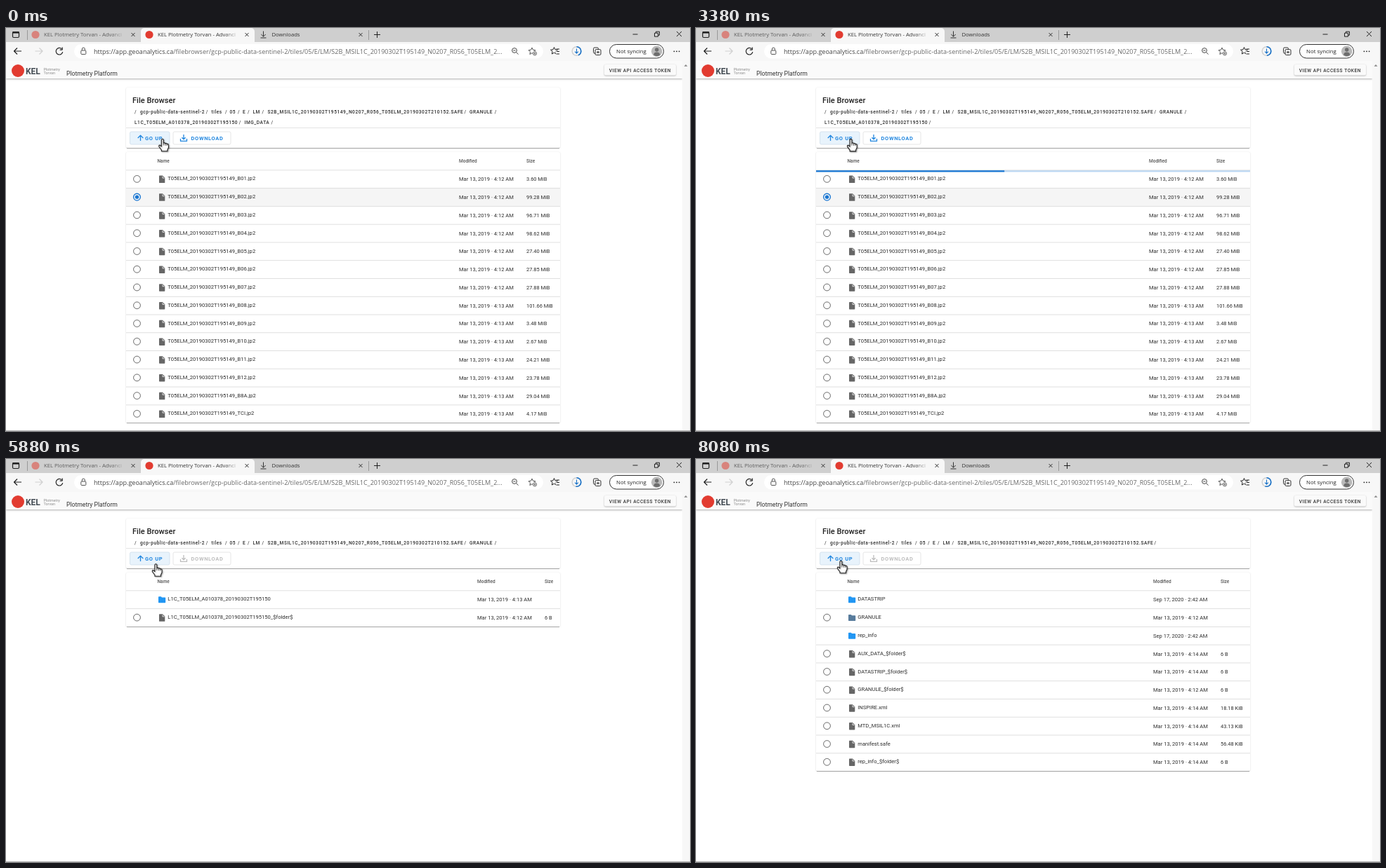
Animation, 974 px wide and 575 px high, one loop 8.18 s. Source, as an HTML page with a canvas:

```html
<!DOCTYPE html>
<html lang="en">
<head>
<meta charset="utf-8">
<title>File Browser</title>
<style>
html, body { margin: 0; width: 100%; height: 100%; overflow: hidden; background: #fff; }
canvas { display: block; width: 974px; height: 575px; }
</style>
</head>
<body>
<canvas id="stage"></canvas>
<script>
const W = 974, H = 575, LOOP = 8180;
const canvas = document.getElementById('stage');
const c = canvas.getContext('2d');
const dpr = window.devicePixelRatio || 1;
canvas.width = W * dpr;
canvas.height = H * dpr;

const UI = '"Open Sans", "Noto Sans", sans-serif';
const APP = 'Roboto, Arial, sans-serif';
const BLUE = '#1976d2', ACTION = '#2387df', RED = '#e23b30';
const SITE = 'KEL Plotmetry Torvan';
const LEFT = 171, WIDE = 618, ROW = 25.77;

// ---------- drawing helpers ----------
function text(s, x, y, size, color, { font = APP, weight = 400, ls = 0 } = {}) {
  c.font = `${weight} ${size}px ${font}`;
  c.letterSpacing = ls + 'px';
  c.fillStyle = color;
  c.fillText(s, x, y);
}
function rect(x, y, w, h, color) {
  c.fillStyle = color;
  c.fillRect(x, y, w, h);
}
function box(x, y, w, h, r, fill, stroke, lw = 1) {
  c.beginPath();
  c.roundRect(x, y, w, h, r);
  if (fill) { c.fillStyle = fill; c.fill(); }
  if (stroke) { c.strokeStyle = stroke; c.lineWidth = lw; c.stroke(); }
}
function disc(x, y, r, fill) {
  c.beginPath();
  c.arc(x, y, r, 0, 7);
  c.fillStyle = fill;
  c.fill();
}
function ring(x, y, r, color, lw, a = 0, b = Math.PI * 2) {
  c.beginPath();
  c.arc(x, y, r, a, b);
  c.strokeStyle = color;
  c.lineWidth = lw;
  c.stroke();
}
// SVG path placed at x, y
function path(d, x, y, stroke, lw = 1, fill) {
  c.save();
  c.translate(x, y);
  const p = new Path2D(d);
  if (fill) { c.fillStyle = fill; c.fill(p); }
  if (stroke) {
    c.strokeStyle = stroke;
    c.lineWidth = lw;
    c.lineJoin = 'round';
    c.stroke(p);
  }
  c.restore();
}
function shadow(alpha, blur, dy) {
  c.shadowColor = `rgba(0,0,0,${alpha})`;
  c.shadowBlur = blur * dpr;
  c.shadowOffsetY = dy * dpr;
}
function card(x, y, w, h) {
  c.save();
  shadow(.22, 1.6, .4);
  box(x, y, w, h, 2, '#fff');
  c.restore();
  rect(x + 1, Math.round(y + h), w - 2, 1, 'rgba(0,0,0,.28)');
}

// ---------- timing ----------
const clamp = v => Math.max(0, Math.min(1, v));
const mix = (a, b, k) => a + (b - a) * k;
function ease(x) {
  let lo = 0, hi = 1, u = .5;
  for (let i = 0; i < 20; i++) {
    u = (lo + hi) / 2;
    const px = .75 * (1 - u) * u + u * u * u;
    if (px < x) lo = u; else hi = u;
  }
  return .3 * (1 - u) * (1 - u) * u + 3 * (1 - u) * u * u + u * u * u;
}

// click, start of loading, end of loading, status bubble, ripple
const visits = [
  { click: 730, start: 855, done: 3430, status: [930, 1480], x: 222, y: 158, r: 6 },
  { click: 4480, start: 4474, done: 5680, status: [4480, 5080], x: 215, y: 157, r: 17 },
  { click: 6930, start: 7030, done: 8030, status: [7030, 7580], x: 205, y: 142, r: 14.5 }
];
// time, x, y of the pointer tip
const moves = [
  [0, 222.8, 158], [1580, 222.8, 158], [1980, 220.5, 158.3], [4330, 220.5, 158],
  [4700, 220.5, 157.5], [5150, 213.4, 149.5], [5880, 213.4, 149.5], [6080, 209, 147],
  [6480, 209, 147], [6630, 206.4, 145], [LOOP, 206.4, 145]
];
function pointer(t) {
  let i = 1;
  while (moves[i][0] < t) i++;
  const [t0, x0, y0] = moves[i - 1], [t1, x1, y1] = moves[i];
  const k = (t - t0) / (t1 - t0);
  return [mix(x0, x1, k), mix(y0, y1, k)];
}

// ---------- data ----------
const march = m => `Mar 13, 2019 · 4:${m} AM`;
const sept = 'Sep 17, 2020 · 2:42 AM';
const file = (name, min, size = '6 B') => ({ name, date: march(min), size, radio: true });
const dir = (name, date = sept, color = '#2196f3') => ({ name, date, size: '', color });

const bands = ['B01', 'B02', 'B03', 'B04', 'B05', 'B06', 'B07', 'B08', 'B09', 'B10', 'B11', 'B12', 'B8A', 'TCI'];
const sizes = '3.60 99.28 96.71 98.62 27.40 27.85 27.88 101.66 3.48 2.67 24.21 23.78 29.04 4.17'.split(' ');
const granule = 'L1C_T05ELM_A010378_20190302T195150';

const tables = [
  { col: 645, rows: bands.map((b, i) => file(`T05ELM_20190302T195149_${b}.jp2`, i < 7 ? 12 : 13, sizes[i] + ' MiB')) },
  { col: 647, rows: [
    dir('AUX_DATA'), dir('IMG_DATA', march(13)), dir('QI_DATA'),
    file('AUX_DATA_$folder$', 12), file('IMG_DATA_$folder$', 12),
    file('MTD_TL.xml', 13, '538.29 KiB'), file('QI_DATA_$folder$', 12)
  ] },
  { col: 671, rows: [dir(granule, march(13)), file(granule + '_$folder$', 12)] },
  { col: 651, rows: [
    dir('DATASTRIP'), { ...dir('GRANULE', march(12), '#587c9c'), radio: true }, dir('rep_info'),
    file('AUX_DATA_$folder$', 14), file('DATASTRIP_$folder$', 14), file('GRANULE_$folder$', 12),
    file('INSPIRE.xml', 14, '18.18 KiB'), file('MTD_MSIL1C.xml', 14, '43.13 KiB'),
    file('manifest.safe', 14, '56.48 KiB'), file('rep_info_$folder$', 14)
  ] }
];
tables[0].rows[1].picked = true;

// label, x, x of the slash, y
const crumbs = [
  ['', 0, 183, 122], ['gcp-public-data-sentinel-2', 191, 284.8, 122], ['tiles', 292.5, 312, 122],
  ['05', 318.5, 330, 122], ['E', 337, 344, 122], ['LM', 351.5, 364.5, 122],
  ['S2B_MSIL1C_20190302T195149_N0207_R056_T05ELM_20190302T210152.SAFE', 372.5, 652.5, 122],
  ['GRANULE', 660, 695.7, 122], [granule, 183, 331.7, 136.8], ['IMG_DATA', 339.5, 377.5, 136.8]
];

// ---------- browser window ----------
function fadeRight(x, color) {
  const g = c.createLinearGradient(x, 0, x + 24, 0);
  g.addColorStop(0, color);
  g.addColorStop(1, color + '00');
  return g;
}
function tab(x, label, color, dot) {
  if (dot) {
    disc(x + 12, 9.5, 5.6, dot);
    text(label, x + 24, 12.3, 7.7, fadeRight(x + 118, color), { font: UI });
  }
  path('M-2.5-2.5L2.5 2.5M2.5-2.5L-2.5 2.5', x + 151, 9.5, '#333', 1);
}
function browser(t) {
  rect(0, 0, W, 21, '#cfcfcf');
  rect(0, 20, W, 27, '#f7f7f7');
  box(192, 0, 162, 24, [5, 5, 0, 0], '#f7f7f7');
  const tabTitle = SITE + ' - Advanci';
  tab(30, tabTitle, '#5c5c5c', '#d8837c');
  tab(192, tabTitle, '#333333', RED);
  tab(354, '', '#444444');
  text('Downloads', 378.5, 12.3, 7.7, '#333', { font: UI });
  path('M0-4.5V3M-3.2 0L0 3.2L3.2 0M-4 5H4', 366.5, 9, '#333', 1);
  rect(30, 3, 1, 14, '#999');
  rect(516, 3, 1, 14, '#999');
  path('M-4.5 0H4.5M0-4.5V4.5', 528.5, 9.5, '#222', 1);
  box(9.5, 5.5, 9, 8, 1.5, null, '#222', 1.2);
  rect(9.5, 5, 9, 2.6, '#222');
  path('M-3.5 0H3.5', 896, 9, '#222', 1);
  path('M-3-1H2V4H-3ZM-1-1V-3H4V2H2', 926.5, 8.2, '#222', 1);
  path('M-3.5-3.5L3.5 3.5M3.5-3.5L-3.5 3.5', 958.5, 8.5, '#222', 1);

  path('M5.5 0H-5M-.5-4.5L-5 0L-.5 4.5', 16.5, 33, '#222', 1.2);
  path('M-5.5 0H5M.5-4.5L5 0L.5 4.5', 47, 33, '#d0d0d0', 1.2);
  ring(76, 33.2, 4.8, '#222', 1.2, .2, 5.5);
  path('M0 0V-3.6M0 0H-3.6', 80.2, 31.2, '#222', 1.2);
  box(97, 23, 668, 20.5, 10, '#fff');
  box(106.8, 32, 7, 5.5, 1, null, '#555', 1);
  path('M-2 0V-2Q-2-4 0-4Q2-4 2-2V0', 110.3, 32, '#555', 1);
  const host = 'https://app.geoanalytics.ca';
  text(host, 125, 36.5, 9.05, '#444', { font: UI });
  text('/filebrowser/gcp-public-data-sentinel-2/tiles/05/E/LM/S2B_MSIL1C_20190302T195149_N0207_R056_T05ELM_2...',
    125 + c.measureText(host).width, 36.5, 9.05, '#696969', { font: UI });

  ring(724, 32, 3.4, '#444', 1);
  path('M0 0L3 3M-4.2-2.6H-1', 726.5, 34.6, '#444', 1);
  const star = 'M0-5L1.5-1.7L5-1.3L2.4 1L3.1 4.5L0 2.7L-3.1 4.5L-2.4 1L-5-1.3L-1.5-1.7Z';
  path(star, 749, 33, '#444', .9);
  disc(753, 36.3, 3.2, '#fff');
  ring(753, 36.3, 2.6, '#444', .8);
  path('M-1.4 0H1.4M0-1.4V1.4', 753, 36.3, '#444', .8);
  path(star, 780.5, 32.5, '#222', 1);
  rect(783, 32.5, 6, 6, '#f7f7f7');
  path('M0-3.5H4.5M.5 0H4.5M0 3.5H4.5', 783.5, 33.5, '#222', 1.1);
  ring(812.5, 33, 6.3, '#d2d2d2', 1.6);
  ring(812.5, 33, 6.3, '#1670c8', 1.6, -Math.PI / 2, Math.PI / 2 - .38 + .76 * t / LOOP);
  path('M0-3.4V3M-2.4.7L0 3.2L2.4.7', 812.5, 33, '#1670c8', 1.1);
  box(836.5, 28, 7, 8, 1.5, null, '#333', 1);
  box(839, 30.5, 8, 8, 1.5, '#f7f7f7', '#333', 1);
  path('M-2 0H2M0-2V2', 843, 34.5, '#333', 1);
  box(859.5, 23.5, 77, 19.5, 9.8, '#fff', '#333', 1);
  text('Not syncing', 869, 36, 7.85, '#222', { font: UI });
  disc(926.7, 33.2, 7.8, '#b9b9b9');
  disc(926.7, 31, 2.7, '#6d6d6d');
  path('M-4.5 4Q-4.5 0 0 0Q4.5 0 4.5 4Q0 7-4.5 4Z', 926.7, 34.4, null, 0, '#6d6d6d');
  for (let i = -1; i < 2; i++) disc(955 + i * 3.6, 33.3, .9, '#222');
}

// ---------- page ----------
function appBar() {
  c.save();
  shadow(.32, 2.5, .7);
  rect(0, 47, 963, 25, '#fafafa');
  c.restore();
  rect(0, 46, W, 1, '#e2e2e2');
  disc(17, 61, 9, RED);
  text('KEL', 28, 66, 12, '#474f57', { weight: 700 });
  text('Plotmetry', 53.5, 61, 5.4, '#8b8b8b');
  text('Torvan', 53.5, 66.3, 5.4, '#8b8b8b');
  text('Plotmetry Platform', 86, 68.3, 8.65, '#333');
  c.save();
  shadow(.3, 2, .8);
  box(852, 52, 102, 15.5, 2, '#fafafa');
  c.restore();
  text('VIEW API ACCESS TOKEN', 858.8, 62.5, 6.6, '#333', { weight: 500, ls: .55 });
  rect(963, 47, 11, 528, '#f7f7f7');
  path('M-2.5 1.2L0-1.5L2.5 1.2Z', 968, 53.5, null, 0, '#888');
}

function toolbar(t, y, off) {
  const hover = t < 4530 || t >= 5880;
  c.save();
  box(176.5, y - 9, 56.5, 18, 2, '#fff');
  c.clip();
  if (hover) rect(176, y - 9, 58, 18, 'rgba(33,135,223,.1)');
  for (const v of visits) {
    const age = t - v.click;
    if (age < 0 || age > 600) continue;
    const fade = 1 - clamp((age - 250) / 350);
    if (hover) rect(176, y - 9, 58, 18, `rgba(33,135,223,${.07 * fade})`);
    disc(v.x, y, v.r + 42 * ease(clamp(age / 300)), `rgba(33,135,223,${.3 * fade})`);
  }
  c.restore();
  box(176.5, y - 9, 56.5, 18, 2, null, hover ? '#d3e0ec' : '#e0e0e0', .9);
  path('M0 4V-3.6M-3.8 0L0-3.8L3.8 0', 191.5, y, ACTION, 1.3);
  text('GO UP', 198, y + 2.7, 7.5, ACTION, { weight: 600, ls: .67 });

  box(238, y - 9, 82, 18, 2, null, '#e4e4e4', .9);
  const [r, g, b] = [35, 135, 223].map(v => Math.round(mix(v, 190, off)));
  const color = `rgb(${r},${g},${b})`;
  path('M0-5V1.4M-2.6-.8L0 1.8L2.6-.8M-4.5 1V4.4H4.5V1', 253, y, color, 1.3);
  text('DOWNLOAD', 263.5, y + 2.7, 7.5, color, { weight: 600, ls: .67 });
}

function progress(y, time) {
  const k = (time % 2200) / 2200;
  const h = 2.2;
  rect(LEFT, y, WIDE, h, '#bad6f2');
  let a, b;
  if (k < .6) {
    const e = ease(k / .6);
    a = mix(-2, 1.07, e);
    b = 1.08 * e;
  } else {
    const e = ease((k - .6) / .4);
    a = mix(-.9, 1, e);
    b = 1.35 * e;
  }
  a = clamp(a);
  b = clamp(b);
  rect(LEFT + a * WIDE, y, (b - a) * WIDE, h, BLUE);
}

function drawRow(row, y, col) {
  if (row.picked) rect(LEFT, y - ROW / 2, WIDE, ROW, '#f5f5f5');
  if (row.radio) {
    ring(186.5, y, 4.9, row.picked ? BLUE : '#666', row.picked ? 1.3 : 1);
    if (row.picked) disc(186.5, y, 2.7, BLUE);
  }
  if (row.color) {
    path('M-5-3.6Q-5-4.4-4.2-4.4H-1.2L0-3.2H4.4Q5.2-3.2 5.2-2.4V3.8Q5.2 4.6 4.4 4.6H-4.2Q-5 4.6-5 3.8Z',
      222, y + .2, null, 0, row.color);
  } else {
    path('M-4-4.6Q-4-5.2-3.3-5.2H1L4.3-2V4.6Q4.3 5.3 3.6 5.3H-3.3Q-4 5.3-4 4.6Z',
      222, y + .4, null, 0, '#666');
    path('M1-4.2V-1.7H3.6', 222, y + .4, '#fff', .8);
  }
  text(row.name, 230.3, y + 2.1, 7.6, '#2c2c2c');
  text(row.date, col, y + 2.9, 7.58, '#2c2c2c');
  text(row.size, col + 96, y + 2.9, 7.45, '#2c2c2c');
}

function page(t) {
  const left = visits.filter(v => t >= v.start + 20).length;
  const { col, rows } = tables[visits.filter(v => t >= v.done).length];
  const busy = visits.find(v => t >= v.start + 20 && t < v.done);
  const dy = left > 1 ? -15 : 0;
  const top = 202.6 + dy;

  card(LEFT, 85, WIDE, 86 + dy);
  text('File Browser', 180, 107, 11.1, '#222', { weight: 500 });
  const style = { weight: 500, ls: .55 };
  for (const [label, x, slash, y] of crumbs.slice(0, crumbs.length - left)) {
    text(label, x, y, 6.6, '#2c2c2c', style);
    text('/', slash, y, 6.6, '#444', style);
  }
  rect(LEFT, 142 + dy, WIDE, .8, '#dedede');
  toolbar(t, 157 + dy, clamp((t - visits[0].done) / 280));

  card(LEFT, 177 + dy, WIDE, top - 177 - dy + rows.length * ROW);
  const head = [['Name', 215.5], ['Modified', col], ['Size', col + 96]];
  for (const [s, x] of head) text(s, x, 191.8 + dy, 6.5, '#555', { weight: 500 });
  rows.forEach((row, i) => {
    drawRow(row, top + ROW * (i + .5) - .1, col);
    rect(LEFT, top + ROW * i - .2, WIDE, .9, '#dcdcdc');
  });
  if (busy) progress(top + .6, t - busy.start);
}

function status(t) {
  if (!visits.some(({ status: [a, b] }) => t >= a && t < b)) return;
  box(-2, 566.5, 324.5, 14, 2, '#f5f5f5', '#dadada', .8);
  text('Waiting for app.geoanalytics.ca...', 1, 577, 7.8, '#333', { font: UI });
}

function cursor(t) {
  const [x, y] = pointer(t);
  c.save();
  shadow(.3, 2, 1);
  c.shadowOffsetX = dpr;
  if (t >= 4480 && t < 4850) {
    path('M0 0V12L2.8 9.5L4.8 14L7 13L5 8.8H8.7Z', x, y, '#222', 1, '#fff');
  } else {
    path('M-1.5 1.5Q0-.9 1.5 1.5V6.3Q3.3 4.8 4 6.8Q5.8 5.6 6.4 7.6Q8.7 6.8 8.7 9.3V12.5L7.1 15.8V17.8H-1.4V16L-4.8 11.5Q-5.8 9-3.6 9.1L-1.5 11Z',
      x, y, '#222', 1.1, '#fff');
    c.shadowColor = 'transparent';
    path('M1.5 6.5V9.5M4 7V9.8M6.4 7.8V10', x, y, '#333', .8);
  }
  c.restore();
}

function draw(t) {
  c.setTransform(dpr, 0, 0, dpr, 0, 0);
  rect(0, 0, W, H, '#fff');
  page(t);
  appBar();
  browser(t);
  rect(0, 574, W, 1, '#b5b5b5');
  status(t);
  cursor(t);
}

const begin = performance.now();
function tick() {
  draw((performance.now() - begin) % LOOP);
  requestAnimationFrame(tick);
}
tick();
</script>
</body>
</html>
```
